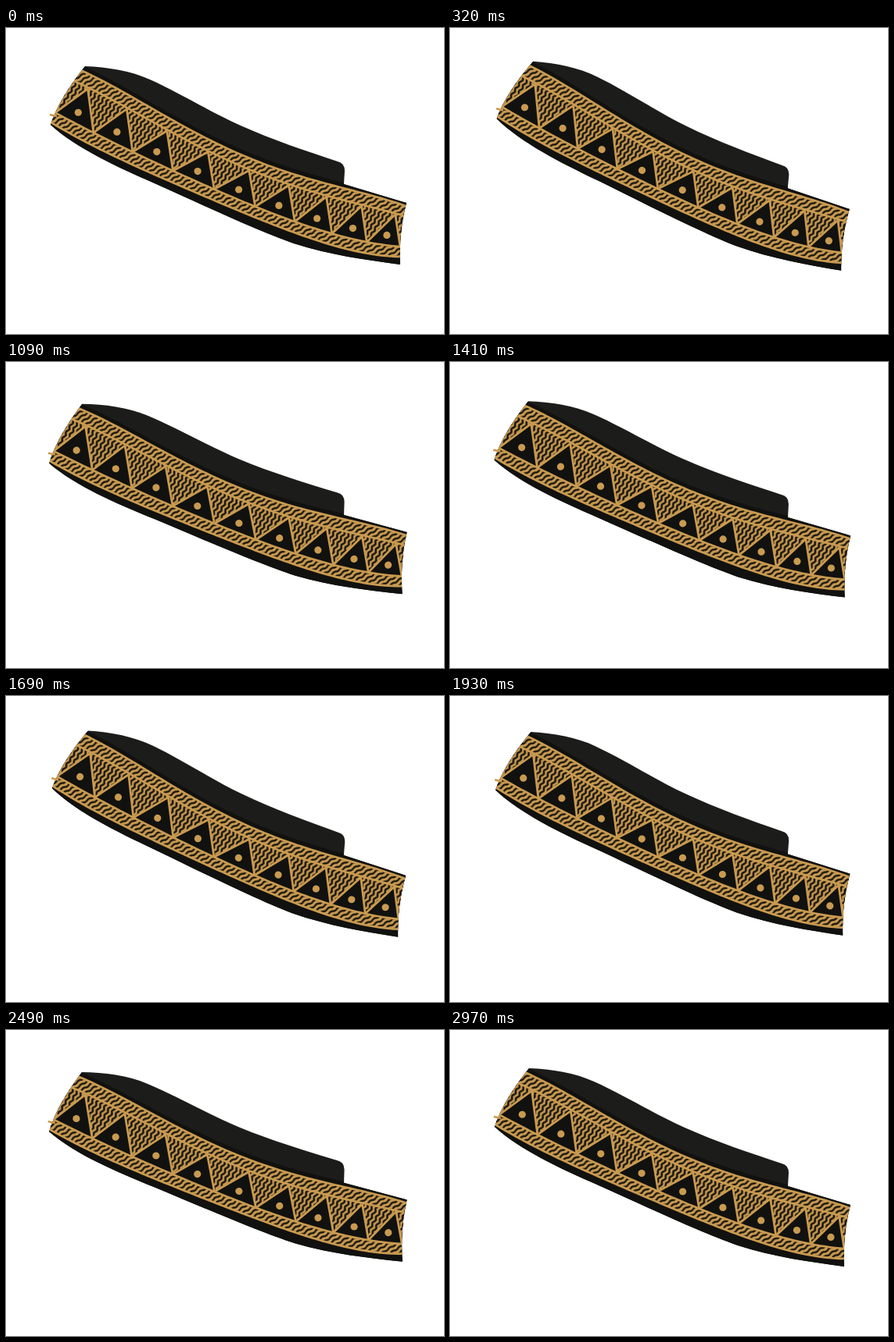
These frames come from a looping animation (560x392 px, 3.01 s). An HTML page:

```html
<!DOCTYPE html>
<html>
<head>
<meta charset="utf-8">
<style>
html, body { margin: 0; width: 100%; height: 100%; overflow: hidden; background: #fff; }
svg { display: block; width: 560px; height: 392px; }
.line { fill: none; stroke: #c99a50; stroke-width: 2.7; stroke-linejoin: round; }
.dark { fill: #11110f; }
.dot, pattern rect { fill: #c99a50; }
pattern path { fill: none; stroke: #15130e; stroke-width: 2.4; }
</style>
</head>
<body>
<svg viewBox="0 0 560 392">
  <defs>
    <clipPath id="clip"><path id="body" d="M101 49C130 50 160 55 184 66C222 83 262 108 300 125C340 143 385 158 424 171Q433 173 433 183L432 200L512 224Q502 262 504 303C460 297 415 291 368 276C320 259 250 226 190 199C140 177 90 154 57 124Q67 92 101 49Z"/></clipPath>
    <pattern id="rope" width="11" height="5.8" patternUnits="userSpaceOnUse" patternTransform="rotate(-31)">
      <rect width="11" height="5.8"/>
      <path d="M-5.5 2.9q2.75-1.6 5.5 0t5.5 0t5.5 0t5.5 0"/>
    </pattern>
    <pattern id="weave" width="9" height="5.8" patternUnits="userSpaceOnUse" patternTransform="rotate(-58)">
      <rect width="9" height="5.8"/>
      <path d="M-4.5 2.9q2.25-2.2 4.5 0t4.5 0t4.5 0t4.5 0"/>
    </pattern>
  </defs>
  <g id="strap">
    <use href="#body" fill="#1c1c1a"/>
    <g id="front" clip-path="url(#clip)"></g>
    <path class="line" d="M56 111L65 113"/>
  </g>
</svg>
<script>
const front = document.getElementById('front');
const strap = document.getElementById('strap');
const { sin, abs, min, floor, PI } = Math;

// Edges of the ornament; v runs from 0 at the upper edge to 1 at the lower one
const upper = q => 162 + 91 * q - 40.6 * q ** 2 - 3 * q ** 3 + 18.3 * q ** 4;
const lower = q => 235 + 87 * q - 8.4 * q ** 2 - 10.3 * q ** 3 - 10.3 * q ** 4;
function point(x, v) {
  const q = (x - 300) / 210;
  return [x, upper(q) + v * (lower(q) - upper(q))];
}
function edge(v) {
  const pts = [];
  for (let x = 48; x <= 516; x += 6) pts.push(point(x, v));
  return pts;
}
const rows = [0, 0.2, 0.81, 1];
const band = (i, id) =>
  `<path d="M${edge(rows[i]).join(' ')} ${edge(rows[i + 1]).reverse().join(' ')}Z" fill="url(#${id})"/>`;

const count = 9;
function valley(i) {
  const a = PI * i / count;
  return 63 + 49 * i + 9 * sin(a) - 5 * sin(2 * a);
}
function triangle(i) {
  const left = valley(i), right = valley(i + 1);
  const at = (k, v) => point(left + k * (right - left), v);
  const [cx, cy] = at(0.6, 0.63);
  return `<path class="line dark" d="M${at(0, 0.81)} ${at(0.85, 0.22)} ${at(1, 0.81)}"/>
    <circle class="dot" cx="${cx}" cy="${cy}" r="4.6"/>`;
}

let art = `<path class="dark" d="M${edge(0).join(' ')}V320H40Z" transform="translate(0 -7)"/>`;
art += band(0, 'rope') + band(1, 'weave') + band(2, 'rope');
for (let i = 0; i < count; i++) art += triangle(i);
for (const v of rows) art += `<path class="line" d="M${edge(v).join(' ')}"/>`;
front.innerHTML = art;

// Tilt up, rest, swing between 2 and -2 degrees, then return to level
function angle(t) {
  if (t < 570) return min(2, t / 160);
  if (t < 2370) return 4 * abs((t - 570) / 600 % 2 - 1) - 2;
  return min(0, (t - 2970) / 300);
}
function draw() {
  const t = performance.now() % 3010;
  const start = t < 570 ? 0 : 570;
  const step = start + floor((t - start) / 40) * 40;
  strap.setAttribute('transform', `rotate(${angle(step)} 280 196)`);
  requestAnimationFrame(draw);
}
draw();
</script>
</body>
</html>
```
